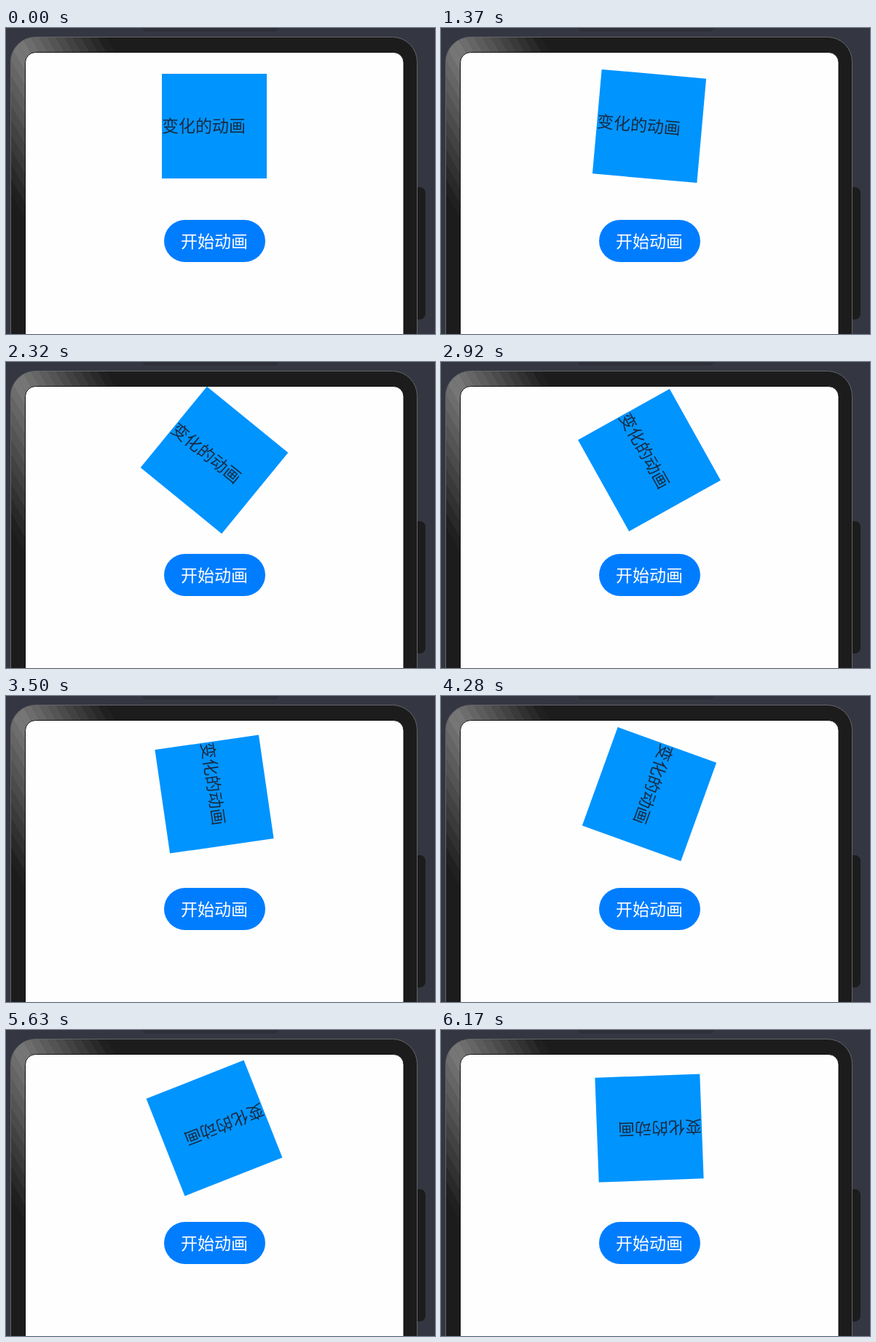
Recreate the animation shown at these times as an HTML page. Size 589 by 421 pixels, loop 6200 ms.

```html
<!DOCTYPE html>
<html lang="zh">
<head>
<meta charset="utf-8">
<style>
  html, body { margin: 0; width: 100%; height: 100%; overflow: hidden; background: #343741; }
  svg { display: block; }
  text { font: 23px "Noto Sans CJK SC", "Noto Sans CJK", sans-serif; }
</style>
</head>
<body>
<svg width="589" height="421" viewBox="0 0 589 421">
  <clipPath id="body"><rect x="6.5" y="12.5" width="558" height="500" rx="34"/></clipPath>

  <rect x="187" y="-10" width="188" height="15" rx="7" fill="#2e3039"/>
  <rect x="555" y="219" width="21" height="182" rx="8" fill="#1c1c1c"/>
  <rect x="6.5" y="12.5" width="558" height="500" rx="34" fill="#1c1c1c"/>
  <g clip-path="url(#body)"><g id="sheen" transform="translate(15 20) rotate(-29.7)"/></g>
  <rect x="6.5" y="12.5" width="558" height="500" rx="34" fill="none" stroke="#64656a"/>
  <rect x="26.5" y="33.5" width="519.5" height="500" rx="14" fill="#fefefe" stroke="#111"/>

  <g id="box">
    <rect x="214" y="63" width="144" height="144" fill="#0094ff"/>
    <text x="214" y="143" fill="#182b42">变化的动画</text>
  </g>

  <rect id="button" x="217" y="264" width="139" height="58" rx="29" fill="#007dff"/>
  <text x="286" y="301.5" text-anchor="middle" fill="#fff" style="font-weight:500">开始动画</text>

  <path id="cursor" d="M0 0V26L6 20.5L10.5 31L15 29L10.5 19H19Z" fill="#fff" stroke="#000"/>
</svg>
<script>
const LOOP = 6200;
const SPIN_START = 1230;
const DEGREES_PER_MS = 0.036;
const PRESS = { hover: 1030, down: 1120, up: 1270 };
const POINTER = { start: 130, end: 420, from: [198, 355], to: [282, 294.5] };

const byId = id => document.getElementById(id);
const sheen = byId('sheen'), box = byId('box'), button = byId('button'), cursor = byId('cursor');

// Stepped metallic highlight, brightest along the corner diagonal.
const BAND = 10, BANDS = 11;
for (let i = -BANDS; i < BANDS; i++) {
  const strength = 1 - Math.abs(i + 0.5) / BANDS;
  const grey = Math.round(28 + 94 * strength);
  const strip = document.createElementNS('http://www.w3.org/2000/svg', 'rect');
  const attributes = { x: i * BAND, y: -300, width: BAND + 0.3, height: 700, fill: `rgb(${grey},${grey},${grey})` };
  for (const name in attributes) strip.setAttribute(name, attributes[name]);
  sheen.append(strip);
}

function buttonColor(t) {
  if (t < PRESS.hover || t >= PRESS.up) return '#007dff';
  return t < PRESS.down ? '#0077f2' : '#0071e6';
}

function draw(t) {
  const angle = Math.max(0, t - SPIN_START) * DEGREES_PER_MS;
  box.setAttribute('transform', `rotate(${angle} 286 135)`);
  button.setAttribute('fill', buttonColor(t));

  const { start, end, from, to } = POINTER;
  const progress = Math.min(1, Math.max(0, (t - start) / (end - start)));
  const [x, y] = from.map((a, i) => a + (to[i] - a) * progress);
  cursor.setAttribute('transform', `translate(${x} ${y})`);
  cursor.setAttribute('visibility', t >= start && t < PRESS.up ? 'visible' : 'hidden');
}

const origin = performance.now();
function tick() {
  draw((performance.now() - origin) % LOOP);
  requestAnimationFrame(tick);
}
draw(0);
requestAnimationFrame(tick);
</script>
</body>
</html>
```
